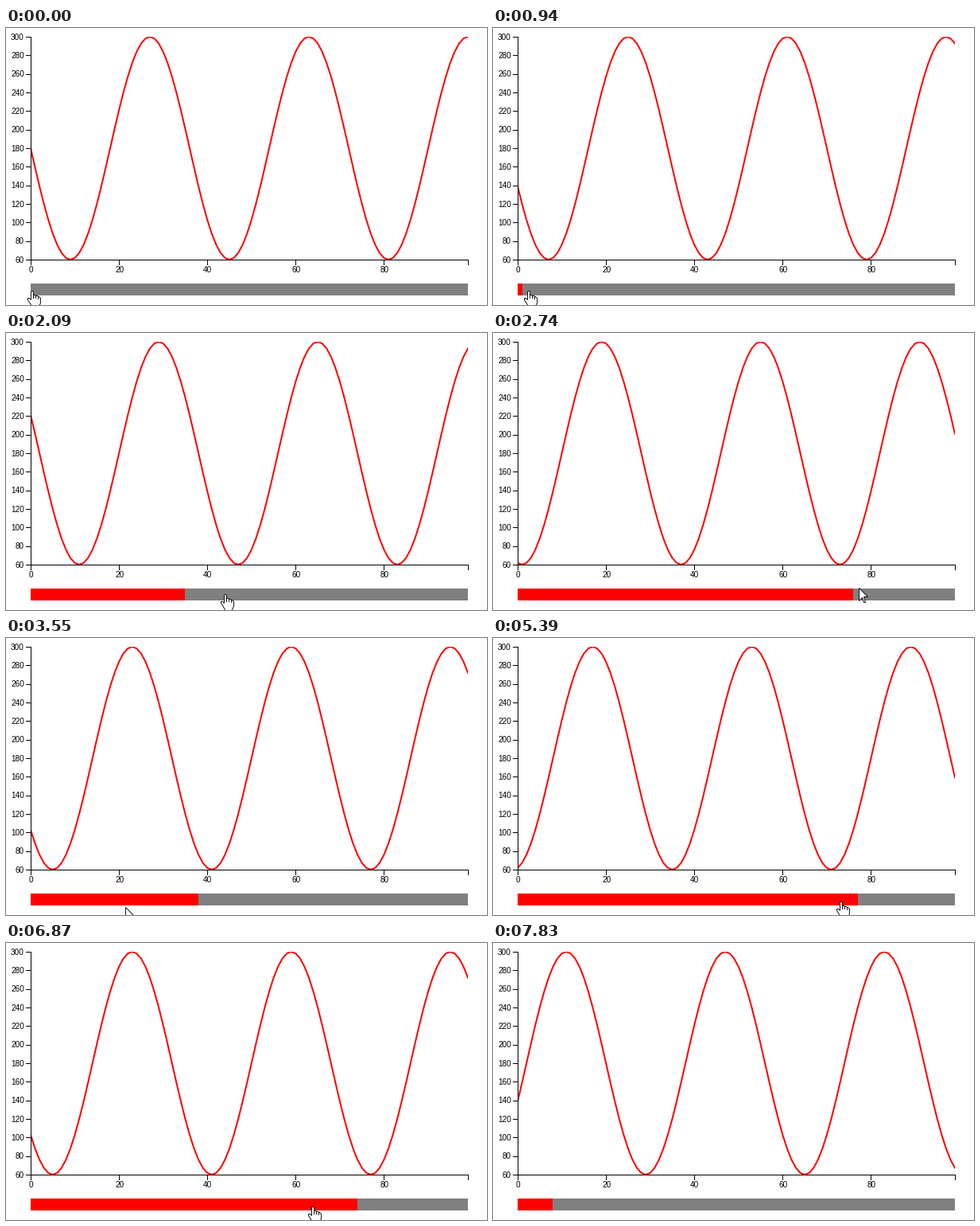
Recreate the animation shown at these times as a matplotlib script. Size 605 px wide and 348 px high, loop 8.65 s.

```python
import numpy as np
import matplotlib.pyplot as plt
from matplotlib.animation import FuncAnimation
from matplotlib.patches import Polygon, Rectangle

W, H, DPI = 605, 348, 64
PX = 72 / DPI                      # one pixel in points
LOOP, STEP = 8650, 25
POLL = 137                         # ms between pointer events
LEFT, RIGHT, TOP, BOTTOM = 31, 581, 11, 291
BAR_TOP, BAR_H = 321, 15
N = 100
UNIT = (RIGHT - LEFT) / (N - 1)

# Pointer path: ms, x, y; repeated positions are rests
PATH = [
    (0, 32, 330), (400, 32, 330), (650, 44, 330), (810, 44, 330),
    (1370, 93, 331), (1510, 94, 331), (2600, 456, 324), (2740, 460, 320),
    (3010, 500, 326), (3415, 244, 332), (3550, 150, 338), (3980, 76, 334),
    (4100, 76, 334), (4270, 76, 334), (4570, 523, 338), (4850, 508, 333),
    (4980, 461, 331), (5255, 461, 331), (5390, 437, 331), (5930, 200, 331),
    (6590, 486, 331), (6730, 443, 331), (6870, 385, 331), (7690, 77, 333),
    (7830, 70, 365),
]

ARROW = np.array([(0, 0), (0, 16), (4, 12), (6, 18), (8, 18), (6, 11),
                  (11, 11)])
HAND = np.array([(5, 0), (6, 0), (7, 1), (7, 5), (9, 5), (10, 6), (12, 6),
                 (13, 7), (14, 7), (16, 9), (16, 15), (14, 19), (14, 21),
                 (5, 21), (5, 19), (0, 11), (0, 9), (2, 9), (4, 11),
                 (4, 1)]) - (5, 0)
GAP = (np.nan, np.nan)
KNUCKLES = np.array([(7, 5), (7, 9), GAP, (10, 6), (10, 9), GAP,
                     (13, 7), (13, 10)]) - (5, 0)

plt.rcParams["font.family"] = "Liberation Sans"
fig = plt.figure(figsize=(W / DPI, H / DPI), dpi=DPI, facecolor="white")
ax = fig.add_axes([0, 0, 1, 1])
ax.set(xlim=(0, W), ylim=(H, 0))
ax.axis("off")


def on_bar(y):
    return BAR_TOP <= y < BAR_TOP + BAR_H


def pointer_events():
    """List (ms, value, x, y); the slider trails the pointer by one event."""
    value = 0
    events = [(0, value, *PATH[0][1:])]
    for start, end in zip(PATH, PATH[1:]):
        if start[1:] == end[1:]:
            continue
        steps = max(1, round((end[0] - start[0]) / POLL))
        for t, x, y in np.linspace(start, end, steps + 1)[1:]:
            _, _, last_x, last_y = events[-1]
            if on_bar(last_y):
                value = int((last_x - LEFT) / UNIT)
            events.append((t, value, x, y))
    return events


def label(x, y, value, align):
    ax.text(x, y, str(value), size=10 * PX, ha=align, va="baseline")


def draw_axes():
    segs = [(LEFT, TOP), (LEFT, BOTTOM), (RIGHT, BOTTOM), (RIGHT, BOTTOM + 6),
            GAP]
    for value in range(60, 301, 20):
        y = BOTTOM - (value - 60) / 240 * (BOTTOM - TOP)
        segs += [(LEFT - 6, y), (LEFT, y), GAP]
        label(LEFT - 8, y + 3.6, value, "right")
    for value in range(0, N, 20):
        x = LEFT + value * UNIT
        segs += [(x, BOTTOM), (x, BOTTOM + 6), GAP]
        label(x + 0.5, BOTTOM + 16, value, "center")
    # Whole coordinates snap to the pixel they name
    ax.plot(*np.round(segs).T, color="black", lw=PX, antialiased=False,
            zorder=3)


def wave(value):
    angle = np.radians(10 * np.arange(N) + 20 * value)
    return (TOP + BOTTOM) / 2 + (BOTTOM - TOP) / 2 * np.sin(angle)


EVENTS = pointer_events()
TIMES = [event[0] for event in EVENTS]

draw_axes()
curve, = ax.plot(LEFT + UNIT * np.arange(N), wave(0), color="red", lw=2 * PX,
                 zorder=2)
curve.set_clip_path(Rectangle((LEFT, TOP), RIGHT - LEFT, BOTTOM - TOP,
                              transform=ax.transData))
ax.add_patch(Rectangle((LEFT, BAR_TOP), RIGHT - LEFT, BAR_H, fc="gray", lw=0))
fill = ax.add_patch(Rectangle((LEFT, BAR_TOP), 0, BAR_H, fc="red", lw=0))
pointer = ax.add_patch(Polygon(ARROW, fc="white", ec="black", lw=0.9 * PX,
                               zorder=5))
knuckles, = ax.plot([], [], color="black", lw=0.9 * PX, snap=False, zorder=6)


def update(i):
    now = (i + 1) * STEP - 1
    _, value, x, y = EVENTS[np.searchsorted(TIMES, now, side="right") - 1]
    curve.set_ydata(wave(value))
    fill.set_width(value * UNIT)

    # The hand shows only while the pointer is over the bar
    hand = on_bar(y)
    spot = np.round([x, y]) + 0.5
    pointer.set_xy((HAND if hand else ARROW) + spot)
    knuckles.set_data(*(KNUCKLES + spot).T)
    knuckles.set_visible(hand)
    return curve, fill, pointer, knuckles


anim = FuncAnimation(fig, update, frames=LOOP // STEP, interval=STEP,
                     repeat=True, repeat_delay=0)
plt.show()
```
